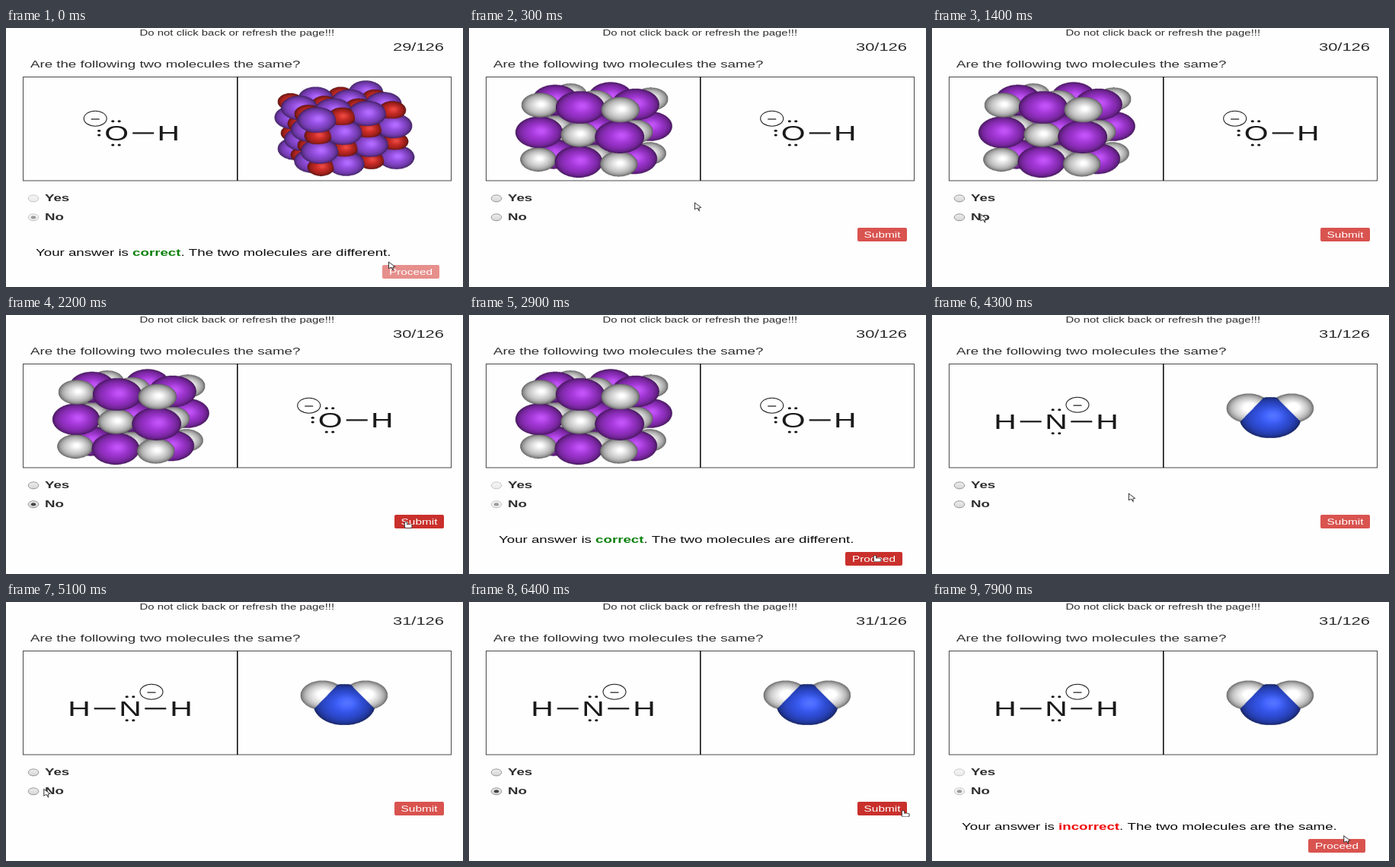
An HTML page with a canvas for the animation above (8000 ms loop, 600x341 px).

```html
<!DOCTYPE html>
<html lang="en">
<head>
<meta charset="utf-8">
<title>Molecule quiz</title>
<style>
html, body { margin: 0; width: 100%; height: 100%; overflow: hidden; background: #fefefe; }
canvas { display: block; width: 600px; height: 341px; }
</style>
</head>
<body>
<canvas id="stage" width="600" height="341"></canvas>
<script>
const stage = document.getElementById('stage');
const ctx = stage.getContext('2d');
const LOOP = 8000;
const WIDE = 1.45; // the page is shown anamorphically widened
const MODEL_WIDE = 1.5;
const DETAIL = 3; // supersampling of the molecule models
const BODY = 12.9;
const INK = '#2e2e2e';

const VIOLET = [150, 78, 228], MAGENTA = [166, 54, 220], RED = [206, 42, 36];
const SILVER = [228, 228, 228], WHITE = [246, 246, 246], BLUE = [52, 86, 240];

const SUBMIT = { label: 'Submit', x: 510, y: 263, w: 65, h: 18 };
const PROCEED = { label: 'Proceed', x: 494, y: 312, w: 75, h: 18 };

const SPOT = {
  start: [503, 309], middle: [297, 231], center: [278, 235],
  no: [38, 248], submit: [571, 275], proceed: [534, 317]
};
const trip = (from, to, spot) => ({ from, to, spot: SPOT[spot] });
const TRIPS = [
  trip(0, 0, 'start'),
  trip(50, 300, 'middle'), trip(1000, 1500, 'no'), trip(1700, 2310, 'submit'), trip(2600, 2900, 'proceed'),
  trip(3200, 3500, 'center'), trip(4100, 5260, 'no'), trip(5600, 6250, 'submit'), trip(7400, 8100, 'proceed')
];

function cursorAt(t) {
  const mix = (a, b, k) => a + (b - a) * k;
  return TRIPS.reduce(([x, y], { from, to, spot }) => {
    const u = Math.min(1, Math.max(0, (t - from) / (to - from || 1)));
    const k = from === to ? 1 : u * u * (3 - 2 * u);
    return [mix(x, spot[0], k), mix(y, spot[1], k)];
  }, SPOT.start);
}

// Depth-buffered spheres, so that overlapping atoms meet in their true seam
function renderModel(atoms) {
  const model = document.createElement('canvas');
  const w = model.width = stage.width * DETAIL;
  const h = model.height = stage.height * DETAIL;
  const pen = model.getContext('2d');
  const image = pen.createImageData(w, h);
  const depth = new Float32Array(w * h).fill(-Infinity);

  for (const { x, y, z, r, color } of atoms) {
    const rx = r * MODEL_WIDE;
    for (let py = Math.ceil((y - r) * DETAIL); py < (y + r) * DETAIL; py++) {
      for (let px = Math.ceil((x - rx) * DETAIL); px < (x + rx) * DETAIL; px++) {
        const nx = (px / DETAIL - x) / rx, ny = (py / DETAIL - y) / r;
        const rest = 1 - nx * nx - ny * ny;
        if (rest < 0) continue;
        const nz = Math.sqrt(rest), i = py * w + px;
        if (z + r * nz <= depth[i]) continue;
        depth[i] = z + r * nz;
        const light = 0.3 + 0.7 * nz;
        const shine = 26 * Math.max(0, nz + 0.1 * (nx - ny)) ** 16;
        color.forEach((c, k) => { image.data[i * 4 + k] = c * light + shine; });
        image.data[i * 4 + 3] = 255;
      }
    }
  }
  pen.putImageData(image, 0, 0);
  return model;
}

// n×n×n alternating atoms along three axes, from the front upper left corner
function lattice(n, x, y, [right, down, back], kinds) {
  const atoms = [];
  for (let i = 0; i < n ** 3; i++) {
    const col = i % n, row = Math.floor(i / n) % n, layer = Math.floor(i / n / n);
    const [dx, dy, z] = right.map((v, k) => v * col + down[k] * row + back[k] * layer);
    const { r, color } = kinds[(col + row + layer) % 2];
    atoms.push({ x: x + dx * MODEL_WIDE, y: y + dy, z, r: r * (1 + 0.0015 * z), color });
  }
  return atoms;
}

const oxideModel = renderModel(lattice(4, 408, 121,
  [[22, -4.3, -6.7], [1.2, 20.6, -8.7], [-7.7, -8, -20]],
  [{ r: 17, color: VIOLET }, { r: 12.4, color: RED }]));

const hydrideModel = renderModel(lattice(3, 93, 101.5,
  [[35.2, 3, 13], [-0.7, 35.7, -7.7], [13.3, -7, -33.8]],
  [{ r: 16.2, color: SILVER }, { r: 21, color: MAGENTA }]));

const amideModel = renderModel([
  { x: 415.5, y: 122.7, z: 0, r: 19.3, color: WHITE },
  { x: 472, y: 122.7, z: 0, r: 19.3, color: WHITE },
  { x: 444, y: 135, z: 0, r: 27, color: BLUE }
]);

function widened(x, y, draw) {
  ctx.save();
  ctx.translate(x, y);
  ctx.scale(WIDE, 1);
  draw();
  ctx.restore();
}

// Draws text and returns the x where it ends
function text(str, x, y, size = BODY, color = INK, weight = 'normal', align = 'left') {
  let width;
  widened(x, y, () => {
    ctx.font = `${weight} ${size}px "Liberation Sans", Arial, sans-serif`;
    ctx.textAlign = align;
    ctx.fillStyle = color;
    ctx.fillText(str, 0, 0);
    width = ctx.measureText(str).width * WIDE;
  });
  return x + width;
}

function oval(x, y, rx, ry, fill, stroke, line = 1) {
  ctx.beginPath();
  ctx.ellipse(x, y, rx, ry, 0, 0, Math.PI * 2);
  if (fill) { ctx.fillStyle = fill; ctx.fill(); }
  if (stroke) { ctx.strokeStyle = stroke; ctx.lineWidth = line; ctx.stroke(); }
}

function bar(x, y, width, line) {
  ctx.fillStyle = '#1a1a1a';
  ctx.fillRect(x - width / 2, y - line / 2, width, line);
}

const atomLabel = (letter, x, y) => text(letter, x, y + 9.8, 28.2, '#1a1a1a', 'normal', 'center');
const bond = (x, y) => bar(x, y, 28, 2.2);

function lonePair(x, y, dx, dy) {
  for (const side of [-1, 1]) oval(x + side * dx, y + side * dy, 2.1, 1.5, '#1a1a1a');
}

function negative(x, y) {
  oval(x, y, 15, 10, null, '#222', 1.1);
  bar(x, y + 0.8, 11, 1.2);
}

function hydroxide(x) {
  const y = 138.4;
  atomLabel('O', x, y);
  bond(x + 35, y);
  atomLabel('H', x + 68, y);
  negative(x - 28, y - 19.2);
  for (const side of [-1, 1]) lonePair(x - 0.7, y + side * 15.7, 4.2, 0);
  lonePair(x - 23, y - 0.3, 0, 2.9);
}

function amide(x) {
  const y = 140.3;
  atomLabel('N', x, y);
  for (const side of [-1, 1]) {
    bond(x + side * 33.3, y);
    atomLabel('H', x + side * 67, y);
    lonePair(x, y + side * 15.5, 4.3, 0);
  }
  negative(x + 28, y - 22);
}

function radio(label, y, checked, disabled) {
  ctx.save();
  if (disabled) ctx.globalAlpha = 0.5;
  const fill = ctx.createLinearGradient(0, y - 5, 0, y + 5);
  fill.addColorStop(0, '#f0f0f0');
  fill.addColorStop(1, '#d4d4d4');
  oval(36, y, 6.8, 4.5, fill, '#8c8c8c', 0.9);
  if (checked) oval(36, y, 3.2, 2, '#444');
  ctx.restore();
  text(label, 51, y + 3.3, BODY, INK, 'bold');
}

function button({ label, x, y, w, h }, hover, disabled) {
  ctx.fillStyle = disabled ? '#e68f8c' : hover ? '#c9302c' : '#d9534f';
  ctx.beginPath();
  ctx.roundRect(x, y, w, h, 2);
  ctx.fill();
  text(label, x + w / 2, y + 13.1, 10.6, '#fff', 'normal', 'center');
}

function feedback(correct) {
  const y = 299.7;
  let x = text('Your answer is ', 39, y, BODY, '#0c0c0c');
  x = text(correct ? 'correct' : 'incorrect', x, y, BODY, correct ? '#0b800b' : '#f00808', 'bold');
  text(`. The two molecules are ${correct ? 'different' : 'the same'}.`, x, y, BODY, '#0c0c0c');
}

function pointer(x, y, hand) {
  widened(x, y, () => {
    ctx.beginPath();
    if (hand) {
      ctx.roundRect(-1.5, 0, 1.6, 5, 0.8);
      ctx.roundRect(-1.5, 3.4, 6, 4, 1);
    } else {
      [[0, 0], [0, 7], [2, 5.6], [3.2, 8], [3.2, 5.2], [4.6, 5]].forEach(p => ctx.lineTo(...p));
      ctx.closePath();
    }
    ctx.strokeStyle = '#333';
    ctx.lineWidth = 1.4;
    ctx.stroke();
    ctx.fillStyle = '#fff';
    ctx.fill();
  });
}

const within = (t, a, b) => t >= a && t < b;
const inside = (b, x, y) => x >= b.x && x <= b.x + b.w && y >= b.y && y <= b.y + b.h;

function render(t) {
  const question = t < 200 ? 29 : t < 3300 ? 30 : 31;
  const answered = t < 200 || within(t, 2650, 3300) || t >= 7400;
  const chosen = t < 200 || within(t, 1600, 3300) || t >= 5450;
  const waiting = t < 200 || within(t, 2500, 2650) || within(t, 3100, 3300) || within(t, 7150, 7400);
  const [x, y] = cursorAt(t);
  const active = answered ? PROCEED : SUBMIT;
  const hover = !waiting && inside(active, x, y);

  ctx.fillStyle = '#fefefe';
  ctx.fillRect(0, 0, stage.width, stage.height);
  text('Do not click back or refresh the page!!!', 175.5, 10.3, 10.31);
  text(`${question}/126`, 508, 29.8, 15.1);
  text('Are the following two molecules the same?', 32, 51.7);

  const model = question === 29 ? oxideModel : question === 30 ? hydrideModel : amideModel;
  ctx.imageSmoothingQuality = 'high';
  ctx.drawImage(model, 0, 0, stage.width, stage.height);
  if (question === 31) amide(163);
  else hydroxide(question === 29 ? 145.2 : 425.7);

  ctx.strokeStyle = '#484848';
  ctx.lineWidth = 1;
  ctx.strokeRect(22.5, 64.5, 562, 136.5);
  ctx.fillStyle = '#111';
  ctx.fillRect(303, 64, 1.6, 137);

  radio('Yes', 224.4, false, answered);
  radio('No', 249.3, chosen, answered);
  if (answered) feedback(question !== 31);
  button(active, hover, waiting);
  pointer(x, y, hover);
}

function tick() {
  render(performance.now() % LOOP);
  requestAnimationFrame(tick);
}
tick();
</script>
</body>
</html>
```
